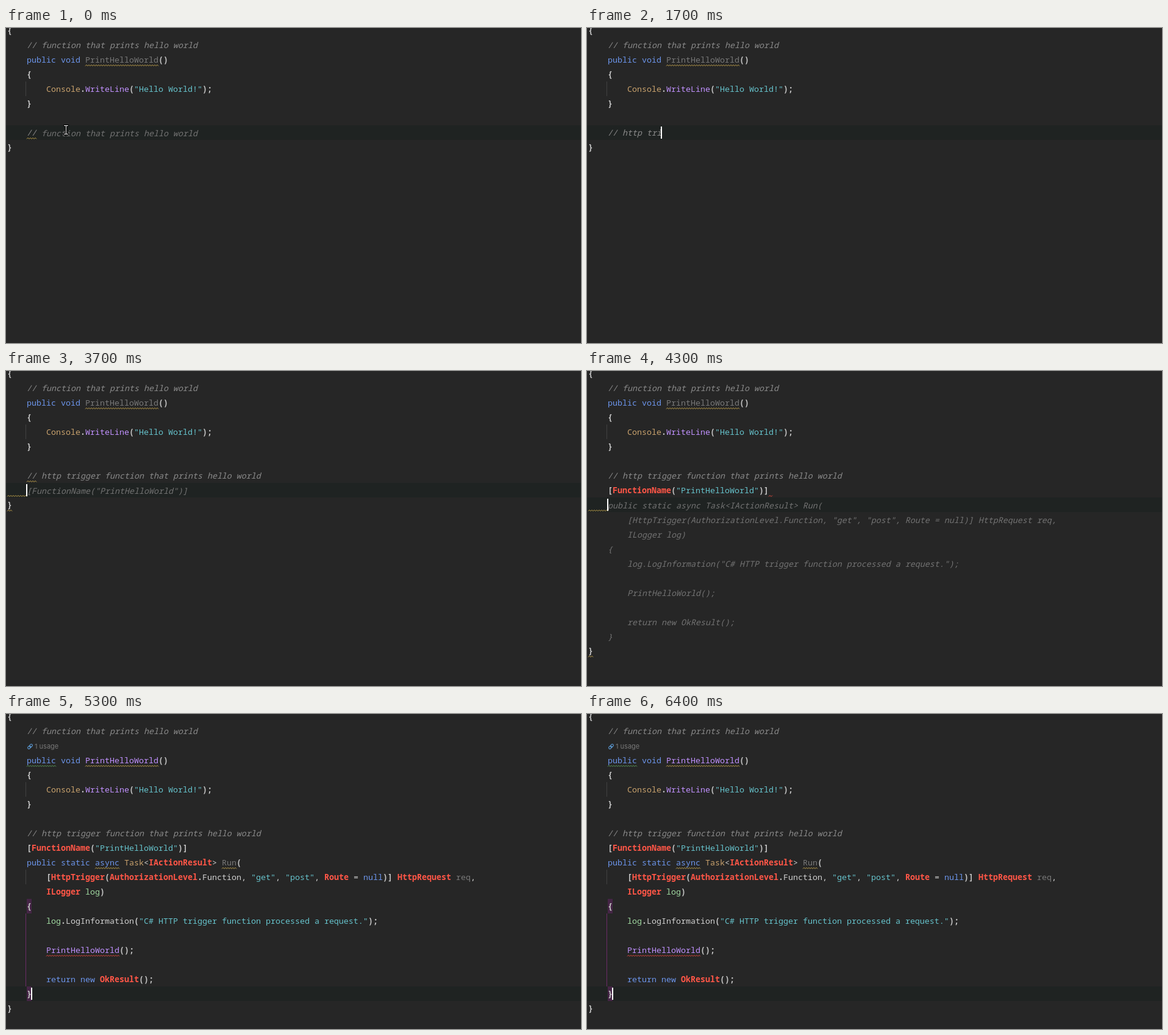
These frames come from a looping animation (943x518 px, 6.7 s). An HTML page with a canvas:

```html
<!DOCTYPE html>
<html lang="en">
<head>
<meta charset="utf-8">
<title>Code completion</title>
<style>
  html, body { margin: 0; width: 100%; height: 100%; overflow: hidden; background: #262626; }
  canvas { display: block; }
</style>
</head>
<body>
<canvas id="stage" width="943" height="518"></canvas>
<script>
const ctx = document.getElementById('stage').getContext('2d');
const LOOP = 6700, CELL = 8, ROW = 24, LEFT = 2;
const MONO = '13.333px "Noto Sans Mono", "DejaVu Sans Mono", monospace';
const YELLOW = '#c4a44c', RED = '#e0483d', GREEN = '#5b9c58';

// style key -> [colour, font prefix]
const STYLES = {
  p: ['#d0d0d0', ''],
  b: ['#c4c4c4', '600 '],
  k: ['#6c95eb', ''],
  s: ['#66c3cc', ''],
  t: ['#c9a26d', ''],
  m: ['#c191ff', ''],
  e: ['#ff5647', 'bold '],
  v: ['#a0d8a0', ''],
  u: ['#787878', ''],
  c: ['#8a8a8a', 'italic '],
  g: ['#727272', 'italic ']
};

// Lines are "|"-separated runs, each starting with its style key.
const COMMENT = '// function that prints hello world';
const HTTP = '// http trigger function that prints hello world';
const LONG = HTTP + ' with a name in the query string and returns a result';
const ATTRIBUTE = 'b[|eFunctionName|b(|s"PrintHelloWorld"|b)]';
const BODY = [
  [4, 'kpublic static |kasync |tTask|p<|eIActionResult|p> |mRun|b('],
  [8, 'b[|eHttpTrigger|b(|eAuthorizationLevel|b.|pFunction, |s"get"|p, |s"post"|p, |eRoute|p = |knull|b)] |eHttpRequest |vreq|p,'],
  [8, 'eILogger |vlog|b)'],
  [4, 'b{'],
  [8, 'vlog|b.|pLogInformation|b(|s"C# HTTP trigger function processed a request."|b);'],
  [8, 'p'],
  [8, 'mPrintHelloWorld|b();'],
  [8, 'p'],
  [8, 'kreturn new |eOkResult|b();'],
  [4, 'b}']
];

let lens = false;
const colX = col => LEFT + col * CELL;
const rowY = row => (row + (lens && row > 1 ? 1 : 0)) * ROW - 8;
const plain = code => code.split('|').map(run => run.slice(1)).join('');

function rect(color, left, y, w, h) {
  ctx.fillStyle = color;
  ctx.fillRect(left, y, w, h);
}

function text(row, col, key, str) {
  const [color, prefix] = STYLES[key];
  ctx.fillStyle = color;
  ctx.font = prefix + MONO;
  ctx.fillText(str, colX(col), rowY(row) + (key === 'g' ? 18 : 17));
}

function line(row, col, code, raw = false) {
  for (const run of code.split('|')) {
    const key = raw && !'ksb'.includes(run[0]) ? 'p' : run[0];
    const str = run.slice(1);
    text(row, col, key, str);
    col += str.length;
  }
}

function wave(row, from, to, color) {
  const y = rowY(row) + 22.5, end = colX(to);
  ctx.strokeStyle = color;
  ctx.lineWidth = 1;
  ctx.beginPath();
  for (let px = colX(from), up = 0; px <= end; px += 2, up ^= 1) ctx.lineTo(px, y - 2 * up);
  ctx.stroke();
}

const guide = (row, rows, color) => rect(color, 32, rowY(row), 1, rows * ROW);
const activeRow = row => rect('#1f2322', 0, rowY(row), 943, ROW);
const caret = (row, col) => rect('#ffffff', colX(col) - 1, rowY(row) + 2, 2, 20);

function pointer(cx, cy) {
  const stroke = (color, width) => {
    ctx.strokeStyle = color;
    ctx.lineWidth = width;
    ctx.beginPath();
    ctx.moveTo(cx - 3, cy - 7); ctx.lineTo(cx + 3, cy - 7);
    ctx.moveTo(cx, cy - 7); ctx.lineTo(cx, cy + 7);
    ctx.moveTo(cx - 3, cy + 7); ctx.lineTo(cx + 3, cy + 7);
    ctx.stroke();
  };
  ctx.lineCap = 'square';
  stroke('#000000', 3);
  stroke('#ffffff', 1);
  ctx.lineCap = 'butt';
}

function usageHint() {
  ctx.save();
  ctx.translate(39.5, 53.5);
  ctx.rotate(-Math.PI / 4);
  ctx.strokeStyle = '#5c9bd6';
  ctx.lineWidth = 1.1;
  for (const dx of [-4.7, -0.7]) {
    ctx.beginPath();
    ctx.roundRect(dx, -1.9, 5.4, 3.8, 1.9);
    ctx.stroke();
  }
  ctx.restore();
  ctx.fillStyle = '#787878';
  ctx.font = '11px Inter, sans-serif';
  ctx.fillText('1 usage', 47, 57);
}

function firstMethod() {
  line(0, 0, 'b{');
  line(1, 4, 'c' + COMMENT);
  line(2, 4, `kpublic void |${lens ? 'm' : 'u'}PrintHelloWorld|b()`);
  wave(2, 16, 31, YELLOW);
  if (lens) {
    usageHint();
    wave(2, 4, 10, GREEN);
  }
  line(3, 4, 'b{');
  guide(4, 1, '#414141');
  line(4, 8, 'tConsole|b.|mWriteLine|b(|s"Hello World!"|b);');
  line(5, 4, 'b}');
}

function typedCount(t) {
  if (t < 800) return 2;
  if (t < 1400) return Math.min(7, 3 + Math.floor((t - 800) / 100));
  if (t < 2000) return Math.min(12, 8 + Math.floor((t - 1400) / 100));
  return t < 2300 ? 13 : HTTP.length;
}

function typeComment(t) {
  const n = typedCount(t);
  activeRow(7);
  text(7, 4, 'c', HTTP.slice(0, n));
  const hint = t < 900 ? COMMENT : t < 1400 ? '' : t < 1500 ? LONG : t < 1800 ? '' : HTTP;
  text(7, 4 + n, 'g', hint.slice(n));
  if (t < 1400) wave(7, 4, t < 800 ? 6 : 7, YELLOW);
  line(8, 0, 'b}');
  if (t >= 200 && t < 600 || t >= 800) caret(7, 4 + n);
  if (t < 600) pointer(98.5, 167.5);
}

function addAttribute(t) {
  activeRow(8);
  text(7, 4, 'c', HTTP);
  line(9, 0, 'b}');
  if (t >= 3000) wave(9, 0, 1, YELLOW);
  if (t >= 3000 && t < 3900) wave(7, 4, 6, YELLOW);
  if (t >= 3900) {
    line(8, 4, ATTRIBUTE, true);
    caret(8, 37);
  } else {
    if (t >= 3700) {
      text(8, 4, 'g', plain(ATTRIBUTE));
      wave(8, 0, 4, YELLOW);
    }
    caret(8, 4);
  }
}

function suggestBody(t) {
  const shown = t >= 4300, last = shown ? 19 : 10;
  activeRow(9);
  text(7, 4, 'c', HTTP);
  line(8, 4, ATTRIBUTE, t < 4100);
  line(last, 0, 'b}');
  if (t >= 4200) {
    wave(8, 37, 37.75, RED);
    wave(9, 0, 4, YELLOW);
    wave(last, 0, 1, YELLOW);
  }
  if (shown) BODY.forEach(([col, code], i) => text(9 + i, col, 'g', plain(code)));
  caret(9, 4);
}

function finishBody(t) {
  const raw = t < 5000;
  activeRow(18);
  text(7, 4, 'c', HTTP);
  line(8, 4, ATTRIBUTE);
  guide(10, 1, '#414141');
  if (t >= 4900) {
    for (const row of [12, 18]) rect('#452546', colX(4), rowY(row), CELL, ROW);
    guide(13, 5, '#6b2c68');
  }
  BODY.forEach(([col, code], i) => {
    if (lens) code = code.replace('mRun', 'uRun').replace('vreq', 'ureq');
    line(9 + i, col, code, raw);
  });
  line(19, 0, 'b}');
  if (t >= 5100) {
    wave(9, 18, 23, YELLOW);
    wave(9, 44, 47, YELLOW);
    wave(15, 8, 23, RED);
  }
  if (t < 6000 || t >= 6400) caret(18, 5);
}

function draw(t) {
  lens = t >= 5300;
  rect('#262626', 0, 0, 943, 518);
  const scene = t < 2700 ? typeComment : t < 4000 ? addAttribute : t < 4800 ? suggestBody : finishBody;
  scene(t);
  firstMethod();
}

const start = performance.now();
function tick() {
  draw((performance.now() - start) % LOOP);
  requestAnimationFrame(tick);
}
tick();
</script>
</body>
</html>
```
